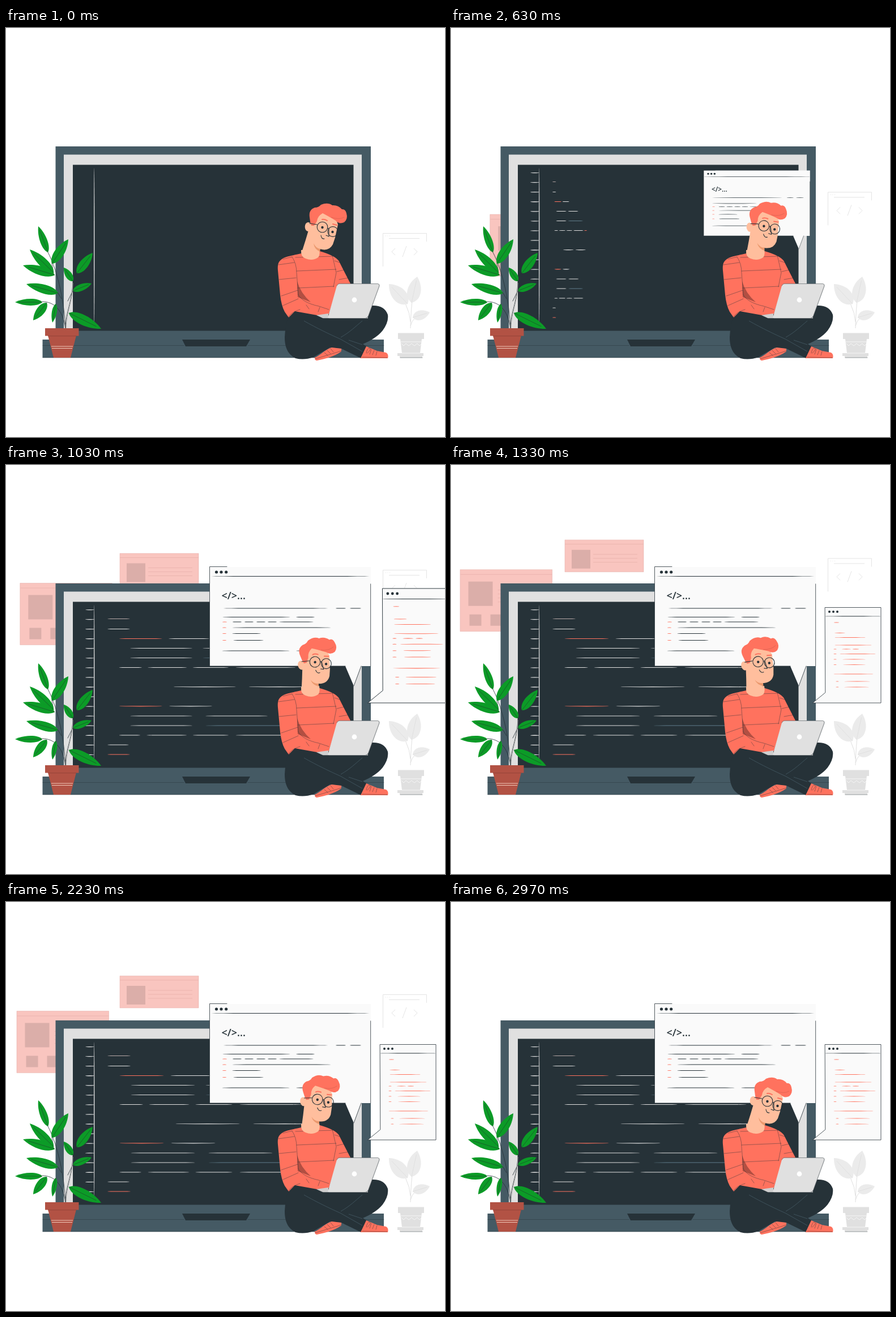
An HTML page that plays this animation: 775 by 722 pixels, repeating every 3010 ms.

```html
<!DOCTYPE html>
<html lang="en">
<head>
<meta charset="utf-8">
<title>Developer at work</title>
<style>
  html, body { margin: 0; width: 100%; height: 100%; overflow: hidden; background: #fff; }
  svg { display: block; width: 775px; height: 722px; }
  .ink { fill: none; stroke: #263238; stroke-width: .8; stroke-linecap: round; }
  .fine { stroke-width: .6; stroke-opacity: .75; }
  .bold { stroke-width: 1.1; }
  .coral { fill: #ff725e; }
  .skin { fill: #ffbe9d; }
  .dark { fill: #263238; }
  .slate { fill: #455a64; }
</style>
</head>
<body>
<svg viewBox="0 0 775 722">
  <g id="pageCard">
    <path fill="#f9c5bf" stroke="#e3aaa4" stroke-width=".5" d="M15.500 183H178V292H15.500Z"/>
    <path fill="none" stroke="#e3aaa4" stroke-width=".6" d="M16 191.500H178M82 219H168M82 226H168M82 233H168M82 240H168"/>
    <path fill="#dbaea9" d="M30 204H73V247H30ZM32 262H53V282H32ZM69 262H90V282H69Z"/>
  </g>
  <g id="noteCard">
    <path fill="#f9c5bf" stroke="#e3aaa4" stroke-width=".5" d="M201 130.500H340V187H201Z"/>
    <path fill="none" stroke="#e3aaa4" stroke-width=".6" d="M201 138H340M251 156H329M251 163H329M251 170H329"/>
    <path fill="#dbaea9" d="M213 148H246V181H213Z"/>
  </g>

  <g id="computer">
    <path class="slate" d="M87.500 209H644V551H87.500ZM64.500 550H667V582H64.500Z"/>
    <path fill="#e0e0e0" d="M102 223.500H628V535H102Z"/>
    <path class="dark" d="M118 241.500H613.500V535H118Z"/>
    <path class="slate" d="M87.500 534.500H644V551H87.500Z"/>
    <path class="ink fine" d="M65 560.500H314M427 560.500H667M65 582H667"/>
    <path class="dark" d="M311 550H431L424 562H317Z"/>
  </g>
  <ellipse cx="155.700" cy="385" rx=".7" ry="138" fill="#e0e0e0"/>
  <g id="ticks"></g>
  <g id="code"></g>

  <g id="faintCard" fill="none" stroke="#dedede" stroke-width=".8">
    <path d="M665.500 222V163.500H742.500V178M676 172.500H730M670 168h1M673.500 168h1M677 168h1"/>
    <path d="M687 190L681 196L687 202M707 186L700 205M720 190L726 196L720 202"/>
  </g>

  <g id="mainBubble">
    <path fill="#fafafa" d="M359.500 180H644V355H627L614 390L599 355H359.500Z"/>
    <path class="ink" d="M390 179.500H359.500V355H599M614 390L627 355M643.700 210V355"/>
    <g class="dark"><circle cx="371.500" cy="189" r="2.600"/><circle cx="380" cy="189" r="2.600"/><circle cx="388.700" cy="189" r="2.600"/></g>
    <text class="dark" x="380.500" y="237" font-size="18" font-weight="600" font-family="Open Sans, Noto Sans, sans-serif">&lt;/&gt;...</text>
  </g>
  <g id="sideBubble">
    <path fill="#fafafa" d="M660.500 251H759V420H638.500L660.500 402Z"/>
    <path class="ink" d="M660.500 251.500H759V420H638.500L660.500 402Z"/>
    <g class="dark"><circle cx="668" cy="259" r="2"/><circle cx="675" cy="259" r="2"/><circle cx="682" cy="259" r="2"/></g>
  </g>

  <g id="man">
    <path class="dark" d="M499 508L512 498L560 510L637 512L646 490Q668 489 674 506Q676 519 665 534C655 546 643 552 630 558L640 564L627 583L592 566L572 564L543 581Q526 587 511 583C497 576 492 563 492 546Q493 525 499 508Z"/>
    <path class="coral" d="M545 582C556 577 564 567 575 564L592 566V571C579 580 564 584 549 587Q545 587 545 582ZM636 562L655 570L671 573Q676 576 674 583L626 583Z"/>
    <path class="ink fine" d="M562 573l6 5M567 569l6 6M573 566l5 6M546 584L576 575L592 570M636 574q2-10 6-9t-4 9M645 567l-3 9M650 569l-3 8M655 571l-2 7M629 581L673 582"/>
    <path fill="none" stroke="#455a64" stroke-width=".8" d="M526 517C549 530 572 541 590 549L629 571M591 546C607 537 617 527 629 517M605 551L629 559"/>
    <path class="coral" d="M521 398C505 402 488 403 482 413Q479 418 480 428L484 471Q486 490 492 501L499 511L510 500L549 507L570 505L586 453H609Q597 430 588 412Q582 402 554 394Z"/>
    <path fill="#b24f42" d="M514 447Q520 468 538 484L515 475Z"/>
    <path class="ink fine" d="M505 404Q513 416 513 432L516 471M516 471C521 480 533 487 552 491L570 497M498 511Q504 501 519 497M576 401L583 432L578 457M489 408L505 404M511 405L577 403M481 418L509 414M513 429L583 426M482 444L512 441M515 459L579 456M486 473L515 463M489 490L516 478M580 411L589 414M584 430L597 427M588 444L605 441M535 496L530 489M551 501L554 493"/>
    <path class="skin" d="M521 392Q520 404 529 407Q541 412 551 405Q555 401 553 390Z"/>
    <g id="head">
      <path class="skin" d="M537 347L529 374L522 396Q526 405 540 404Q552 400 554 390Q570 395 577 382L581 370L586 347L579 325L557 321Z"/>
      <path fill="#eb996e" d="M543 380Q547 389 555 390L554 395Q544 390 543 380Z"/>
      <path class="coral" d="M538 349L536 334Q534 321 545 317Q552 317 556 312Q568 307 576 313Q586 312 593 320Q599 319 601 327Q604 337 597 343Q588 347 582 340Q567 331 559 327Q550 332 549 341L544 349Z"/>
      <ellipse class="skin" cx="533.500" cy="351" rx="5.800" ry="8"/>
      <path class="ink bold" d="M536 345L549 347M567.500 354Q569 353 570 355M570 354L570 368L565 366M556 366Q557 373 562 372"/>
      <g class="ink bold"><circle cx="558.500" cy="351.500" r="9.300"/><circle cx="577" cy="359.500" r="8.900"/></g>
      <g class="dark"><circle cx="558.500" cy="352" r="2.200"/><circle cx="576.500" cy="360" r="2.200"/></g>
      <path fill="none" stroke="#ff725e" stroke-width="2" stroke-linecap="round" d="M558 338Q562 337 567 340M577 346L584 348"/>
      <path fill="none" stroke="#c95a4b" stroke-width=".5" d="M574 334Q588 339 597 334"/>
    </g>
    <path fill="#cfcfcf" d="M548 507L569 504V510L639 510V512.500H560Z"/>
    <path fill="#bdbdbd" d="M589 451.500H656Q660 452 659 456L640 508Q638 513 634 512.500H570Z"/>
    <path fill="#e0e0e0" d="M588 451.500H655Q659 452 658 456L639 508Q637 512 633 512H568L584 455Q585 452 588 451.500Z"/>
    <path class="ink fine" d="M584 455Q585 452 588 451.500H656Q660 452 659 456L640 508Q638 513 634 512.500H548"/>
    <circle cx="615" cy="480" r="4.400" fill="#fff"/>
  </g>

  <g id="palePlant">
    <path fill="none" stroke="#e0e0e0" d="M714 530C715 507 715 488 721 458M714 519Q712 487 685 460M714 526Q718 508 741 503"/>
    <path fill="#e0e0e0" d="M692 538.500H738V549H692ZM696 549H734L731 574H699ZM691 574H737V579H691ZM695 579H735V582H695Z"/>
    <path fill="none" stroke="#f5f5f5" d="M697 554H733M698 557l4 4l4-4l5 4l5-4l5 4l5-4l4 4l3-3M699 574H731"/>
    <path class="ink fine" d="M696 582H735"/>
  </g>
  <g id="plant">
    <path class="ink" d="M105 530C103 488 93 432 74 396M105 530C105 500 119 480 118 440L125 433M105 530C100 496 84 483 64 483M81 416L84 432M92 468L98 478M109 482L118 464"/>
    <path fill="none" stroke="#9e9e9e" d="M106 530C106 501 118 483 118 450"/>
    <g id="leaves"></g>
    <path fill="#b25244" d="M69 530H128.500V543.500H69ZM74 543H124L114 582H84Z"/>
    <path fill="none" stroke="#8e4136" stroke-width=".8" d="M74 543.700H124"/>
    <path fill="none" stroke="#f0c8b8" stroke-width="1" d="M80 562H118M81 565.500H117"/>
  </g>
</svg>
<script>
const LOOP = 3010;
const CORAL = '#ff725e', INK = '#263238', PALE = '#e0e0e0', DIM = '#607d8b';
const $ = id => document.getElementById(id);

function add(parent, tag, attrs) {
  const node = document.createElementNS('http://www.w3.org/2000/svg', tag);
  for (const key in attrs) node.setAttribute(key, attrs[key]);
  return parent.appendChild(node);
}

// Each row is y, colour, then pairs of left and right ends.
function addBars(parent, rows, thickness) {
  for (const [y, fill, ...ends] of rows) {
    for (let i = 0; i < ends.length; i += 2) {
      const rx = (ends[i + 1] - ends[i]) / 2;
      add(parent, 'ellipse', { cx: ends[i] + rx, cy: y, rx, ry: thickness / 2, fill });
    }
  }
}

function addLeaf(parent, [x0, y0, x1, y1, width], fill, rib) {
  const dx = x1 - x0, dy = y1 - y0, length = Math.hypot(dx, dy);
  const point = (along, side) => {
    const out = side * width * .66 / length;
    return `${x0 + dx * along - dy * out} ${y0 + dy * along + dx * out}`;
  };
  add(parent, 'path', { d: `M${x0} ${y0}C${point(.15, 1)} ${point(.65, 1)} ${x1} ${y1}C${point(.65, -1)} ${point(.15, -1)} ${x0} ${y0}`, fill });
  add(parent, 'path', { d: `M${x0} ${y0}L${point(.85, 0)}`, stroke: rib, 'stroke-width': .7 });
}

addBars($('code'), [
  [271.5, '#b9a9a8', 179, 220],
  [289.5, PALE, 179, 220],
  [306.5, CORAL, 200, 279], [306.5, PALE, 290, 365],
  [323.5, PALE, 220, 334, 352, 465],
  [340.5, PALE, 220, 334], [340.5, DIM, 352, 518],
  [357.5, PALE, 200, 242, 252, 324, 334, 400, 412, 522], [357.5, CORAL, 532, 562],
  [391.7, PALE, 299, 413, 436, 548],
  [425.8, CORAL, 200, 279], [425.8, PALE, 291, 370],
  [443, PALE, 220, 334, 357, 471],
  [460, PALE, 220, 334], [460, DIM, 357, 518],
  [477, PALE, 200, 239, 250, 324, 334, 400, 412, 522],
  [494, PALE, 179, 218],
  [511, CORAL, 179, 220]
], 1.2);

addBars($('mainBubble'), [
  [196.5, INK, 360, 644],
  [253, INK, 382, 570, 582, 600, 607, 627],
  [268.5, INK, 382, 502, 512, 545],
  [277, CORAL, 382, 390], [277, INK, 400, 416, 421, 437, 442, 458, 462, 478, 482, 543],
  [287, CORAL, 382, 389], [287, INK, 399, 574],
  [297.5, CORAL, 382, 389], [297.5, INK, 399, 450],
  [309.5, CORAL, 382, 389], [309.5, INK, 401, 455],
  [328, INK, 381, 501, 512, 562]
], 1.15);

addBars($('sideBubble'), [
  [267, INK, 660, 759],
  [278, CORAL, 676, 685],
  [296.5, CORAL, 677, 696],
  [304.5, CORAL, 677, 732],
  [318, CORAL, 677, 743],
  [325, CORAL, 675, 681, 690, 706, 709, 720],
  [333.5, CORAL, 675, 681, 686, 750],
  [343, CORAL, 675, 681, 691, 732],
  [352.5, CORAL, 675, 681, 692, 732],
  [369, CORAL, 675, 746],
  [382, CORAL, 679, 685, 694, 740],
  [392, CORAL, 679, 685, 694, 738]
], .9);

for (let i = 0; i < 16; i++) addBars($('ticks'), [[255.6 + i * 17.05, PALE, 140, 156]], 1.3);
const ticks = [...$('ticks').children];

[
  [74, 396, 57, 350, 13], [81, 416, 110, 373, 17], [84, 432, 42, 391, 16], [86, 436, 30, 419, 16],
  [92, 468, 36, 452, 16], [64, 484, 16, 484, 12], [72, 485, 48, 516, 15], [88, 487, 82, 520, 9],
  [118, 447, 102, 423, 12], [125, 433, 153, 397, 16], [118, 464, 151, 451, 12], [111, 503, 168, 531, 18]
].forEach(leaf => addLeaf($('leaves'), leaf, '#0c9b27', '#1d4a2b'));

[[709, 487, 676, 452, 25], [716, 485, 726, 439, 24], [718, 511, 748, 502, 17]]
  .forEach(leaf => addLeaf($('palePlant'), leaf, '#ebebeb', '#dcdcdc'));

const clamp = x => Math.min(1, Math.max(0, x));
const ramp = (t, from, to) => clamp((t - from) / (to - from));

// The standard "ease" curve, cubic-bezier(.25, .1, .25, 1).
function ease(x) {
  if (x <= 0 || x >= 1) return clamp(x);
  const bezier = (s, a, b) => 3 * (1 - s) * (1 - s) * s * a + 3 * (1 - s) * s * s * b + s ** 3;
  let low = 0, high = 1;
  for (let i = 0; i < 24; i++) {
    const mid = (low + high) / 2;
    if (bezier(mid, .25, .25) < x) low = mid; else high = mid;
  }
  return bezier(low, .1, 1);
}

function place(id, transform, visible = true) {
  $(id).setAttribute('transform', transform);
  $(id).setAttribute('visibility', visible ? 'visible' : 'hidden');
}

const scaleAt = (x, y, sx, sy = sx) => `translate(${x} ${y}) scale(${sx} ${sy}) translate(${-x} ${-y})`;

function render(t) {
  const away = (from, to) => 1 - ease(ramp(t, 385, 1452)) + ramp(t, from, to) ** 2.5;
  const page = away(2130, 2490), late = away(2250, 2695);
  place('pageCard', `translate(${84 * page} ${230 * page})`, page < 1);
  place('noteCard', `translate(0 ${230 * late})`, late < 1);
  place('faintCard', `translate(0 ${199 * late})`, t < 2700);

  ticks.forEach((tick, i) => tick.setAttribute('visibility', t >= 140 + i * 43 ? 'visible' : 'hidden'));

  const typed = ease(ramp(t, 546, 1167));
  place('code', scaleAt(179, 0, typed, 1), typed > 0);

  const main = ramp(t, 80, 915);
  place('mainBubble', scaleAt(614, 390, main), main > 0);

  const side = 1.2 * ramp(t, 670, 1020) - .2 * ramp(t, 1030, 1200);
  place('sideBubble', scaleAt(638.5, 420, side), side > 0);

  const tilt = -19 * (1 - Math.cos(2 * Math.PI * t / LOOP)) / 2;
  place('head', `rotate(${tilt} 537 400)`);
}

const start = performance.now();
function tick() {
  render((performance.now() - start) % LOOP);
  requestAnimationFrame(tick);
}
tick();
</script>
</body>
</html>
```
